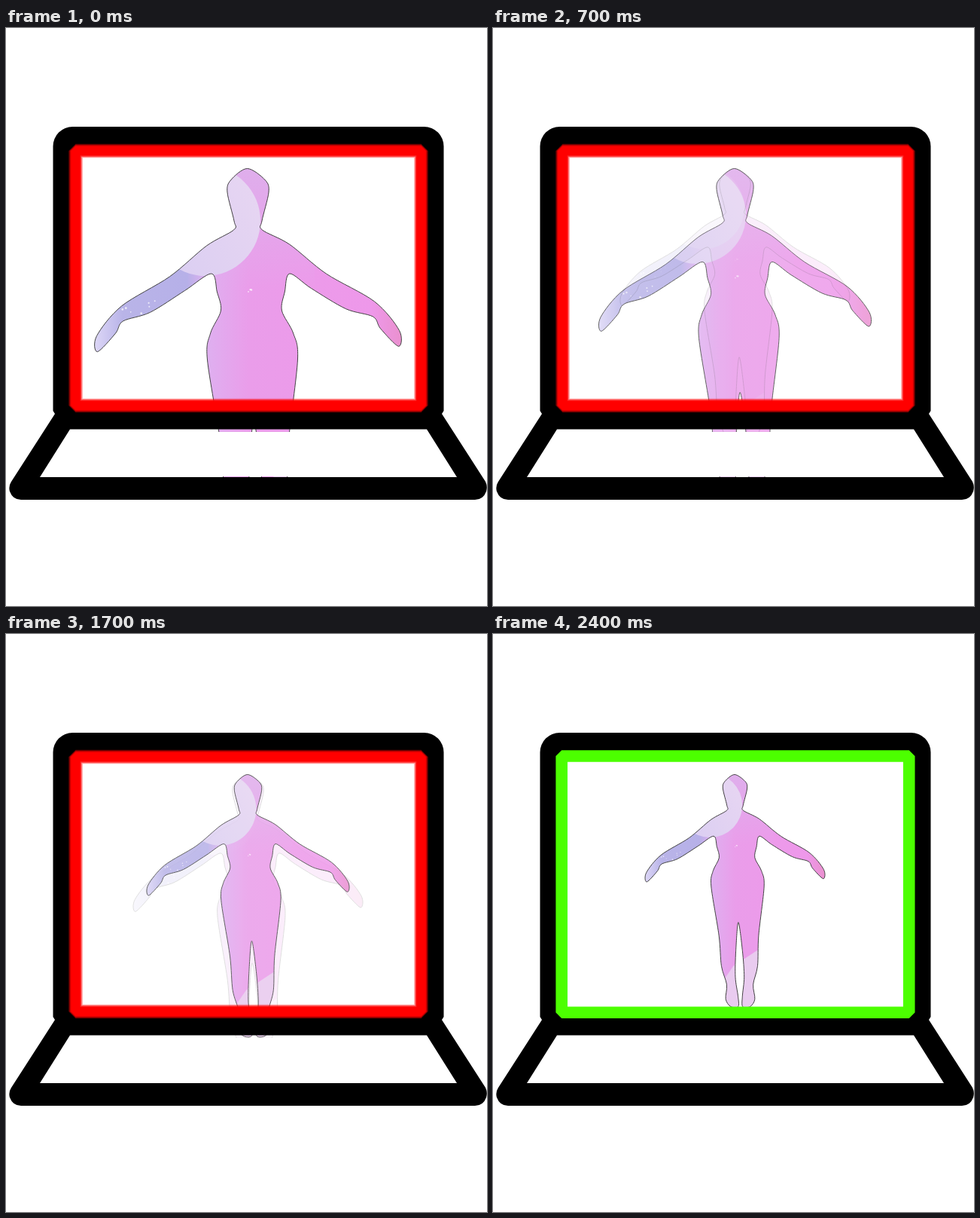
An HTML page that plays this animation: 639 by 767 pixels, repeating every 4400 ms.

```html
<!DOCTYPE html>
<html lang="en">
<head>
<meta charset="utf-8">
<title>Body fitting into a screen</title>
<style>
  html, body { margin: 0; width: 100%; height: 100%; overflow: hidden; background: #fff; }
  svg { display: block; width: 639px; height: 767px; }
  .outline { fill: none; stroke: #444; stroke-width: 1; }
  .frame { fill: none; stroke-linejoin: bevel; }
</style>
</head>
<body>
<svg viewBox="0 0 639 767">
  <defs>
    <path id="shape" vector-effect="non-scaling-stroke"/>
    <clipPath id="inside"><use href="#shape"/></clipPath>
    <linearGradient id="wash" gradientUnits="userSpaceOnUse" x1="118" x2="526" y1="0" y2="0">
      <stop offset="0" stop-color="#dcd6f6"/>
      <stop offset=".09" stop-color="#b9b4e8"/>
      <stop offset=".3" stop-color="#b6b0e8"/>
      <stop offset=".36" stop-color="#deb0f0"/>
      <stop offset=".5" stop-color="#ea9dea"/>
      <stop offset=".9" stop-color="#ee98ea"/>
      <stop offset="1" stop-color="#ea90ce"/>
    </linearGradient>
    <linearGradient id="glow" gradientUnits="userSpaceOnUse" x1="225" x2="340" y1="300" y2="240">
      <stop offset="0" stop-color="#dccff2"/>
      <stop offset="1" stop-color="#e6d5f2"/>
    </linearGradient>
    <linearGradient id="face" gradientUnits="userSpaceOnUse" x1="0" x2="0" y1="186" y2="345">
      <stop offset="0" stop-color="#dfaeec"/>
      <stop offset="1" stop-color="#dfaeec" stop-opacity="0"/>
    </linearGradient>
    <g id="body">
      <g clip-path="url(#inside)">
        <path fill="url(#wash)" d="M110 180H535V720H110Z"/>
        <path fill="url(#face)" d="M285 180H410V345H285Z"/>
        <circle cx="265" cy="256" r="73" fill="url(#glow)"/>
        <path fill="#e9cbef" d="M385 576L318 620L290 660V720H385Z"/>
        <g id="specks" fill="#fff" fill-opacity=".7"></g>
      </g>
      <use href="#shape" class="outline"/>
    </g>
  </defs>

  <g id="poses"></g>
  <path fill="#fff" d="M40 536H605V595H40ZM0 597H639V767H0Z"/>
  <path fill-rule="evenodd" d="M62.5 508V157A26 26 0 0 1 88.5 131H555.5A26 26 0 0 1 581.5 157V508L579 512L637 602
    Q640 608 638 615Q634 626 623 626H20Q9 626 5 615Q3 608 7 602L65 512Z
    M90 161V503H554V161Z M85 532.6L45 596H599L559 532.6Z"/>
  <g id="tooBig"></g>
  <rect id="fits" class="frame" x="91.2" y="162" width="461.5" height="340.3" stroke="#4cff00" stroke-width="15.6"/>
</svg>

<script>
const STEP = 100, FADE = 6, LOOP = 4400;
const SCALES = [1, .888, .748, .66, .586];
const AXIS = 321.5, TOP = 186.5;

// Key points of one half: [distance from the axis, height].
const head = [[23, 202], [27.5, 218], [18.5, 256], [19, 268]];
const arm = [
  [55, 288], [104, 328], [168, 366], [201, 405], [200, 426],
  [176, 402], [166, 386], [130, 375], [84, 347]
];
const trunk = [[52, 326], [45, 350], [40.5, 375], [55, 405], [60, 440]];
const leg = [
  [45, 551], [41, 620], [30, 662], [33, 695], [22, 712],
  [5, 712], [5, 688], [10, 645], [7.5, 586]
];

// The arms tilt a little to one side, and the lower body leans to the other.
function half(side) {
  const upright = ([x, y]) => [AXIS + side * x, y];
  const tilted = ([x, y]) => [AXIS + side * x, y - side * x * .018];
  const leaning = ([x, y]) => [AXIS + side * x + (y - TOP) * .0235, y];
  return [...head.map(upright), ...arm.map(tilted), ...[...trunk, ...leg].map(leaning)];
}

function smoothPath(points) {
  const n = points.length;
  const at = i => points[(i + n) % n];
  let d = `M${at(0)}`;
  for (let i = 0; i < n; i++) {
    const [a, b, c, e] = [at(i - 1), at(i), at(i + 1), at(i + 2)];
    const out = b.map((v, k) => v + (c[k] - a[k]) / 6.5);
    const back = c.map((v, k) => v - (e[k] - b[k]) / 6.5);
    d += `C${out} ${back} ${c}`;
  }
  return d + "Z";
}

const byId = id => document.getElementById(id);
function add(parent, name, attrs) {
  const node = document.createElementNS("http://www.w3.org/2000/svg", name);
  for (const key in attrs) node.setAttribute(key, attrs[key]);
  return parent.appendChild(node);
}

const crown = [AXIS - 1, TOP], crotch = [AXIS + 7.5, 521];
byId("shape").setAttribute("d", smoothPath([crown, ...half(1), crotch, ...half(-1).reverse()]));

// White paint spots: a few on the chest, more along the blue forearm.
let seed = 7;
const random = () => (seed = seed * 16807 % 2147483647) / 2147483647;
function spray(count, x, y, dx, dy) {
  for (let i = 0; i < count; i++) {
    add(byId("specks"), "circle", { cx: x + dx * random(), cy: y + dy * random(), r: .7 + random() * .8 });
  }
}
spray(3, 322, 337, 12, 14);
spray(14, 125, 360, 80, 40);

// Soft red border: nested strokes that get denser towards the middle.
for (let i = 0; i < 3; i++) {
  add(byId("tooBig"), "rect", {
    class: "frame", x: 92.5, y: 163, width: 459, height: 338,
    stroke: "#f00", "stroke-width": 18.5 - i * 3, "stroke-opacity": .4 + i * .3
  });
}

const poses = SCALES.map(s => add(byId("poses"), "use", {
  href: "#body",
  transform: `translate(${AXIS} ${TOP}) scale(${s}) translate(${-AXIS} ${-TOP})`
}));

const start = performance.now();
function draw() {
  const time = (performance.now() - start) % LOOP;
  const progress = Math.min(Math.floor(time / STEP) / FADE, SCALES.length - 1);
  poses.forEach((pose, i) => {
    const opacity = Math.max(0, 1 - Math.abs(progress - i));
    pose.style.opacity = opacity;
    pose.style.display = opacity ? "" : "none";
  });
  const fit = Math.max(0, progress - 3);
  byId("tooBig").style.opacity = 1 - fit;
  byId("fits").style.opacity = fit;
  requestAnimationFrame(draw);
}
draw();
</script>
</body>
</html>
```
